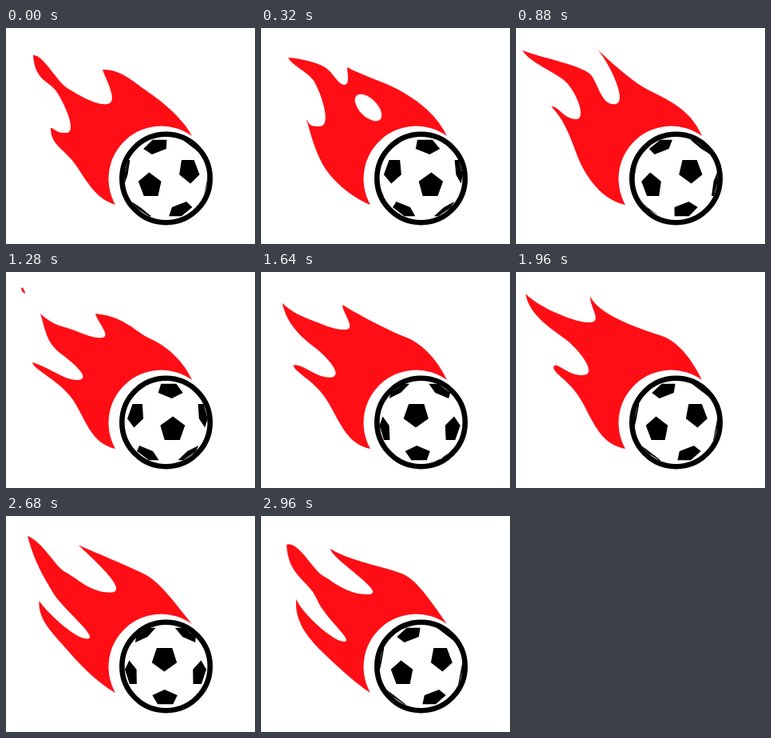
These frames come from a looping animation (312x270 px, 3000 ms). An HTML page:

```html
<!DOCTYPE html>
<html lang="en">
<head>
<meta charset="utf-8">
<title>Flaming football</title>
<style>
html, body { margin: 0; width: 100%; height: 100%; overflow: hidden; background: #fff; }
svg { display: block; width: 312px; height: 270px; }
#flame, #hole, #spark { animation: 3000ms infinite; }
#flame { fill: #ff0e15; animation-name: flicker; }
#hole { fill: #fff; animation-name: gap; animation-timing-function: steps(4); }
#spark { fill: #ff0e15; animation-name: fly; animation-timing-function: steps(4); }

/* Each outline: upper edge, upper tongue, notch, main tongue, notch, lower tongue, arc round the ball */
@keyframes flicker {
  0% {
    animation-timing-function: steps(8);
    d: path("M233 135C220 110 190 88 174 77S144 52 121 52C124 62 142 93 127 95S92 84 78 76S46 32 34 34C36 66 54 66 63 79S90 130 76 131S60 124 56 125C56 148 74 150 90 175S116 214 137 221A66 66 0 0 1 233 135Z");
  }
  10.66% {
    animation-timing-function: steps(7);
    d: path("M233 135C218 104 190 87 172 77S128 60 108 49C108 56 112 72 104 71S90 55 80 49S50 38 34 37C40 48 58 54 66 66S90 122 74 123S60 116 57 115C62 130 66 150 77 170S114 212 137 221A66 66 0 0 1 233 135Z");
  }
  20% {
    animation-timing-function: steps(7);
    d: path("M233 135C218 102 189 88 168 77S120 46 103 34C110 44 128 84 115 84S97 64 87 53S40 30 14 12C28 42 52 53 64 66S90 119 74 118S57 107 50 106C60 121 66 140 76 162S109 213 137 221A66 66 0 0 1 233 135Z");
  }
  29.33% {
    animation-timing-function: steps(10);
    d: path("M233 135C218 100 188 89 165 77S112 36 99 24C112 34 142 92 125 95S104 73 95 60S34 38 8 28C18 44 48 54 62 67S90 116 74 114S54 98 44 98C58 112 66 130 75 155S104 214 137 221A66 66 0 0 1 233 135Z");
  }
  42.66% {
    animation-timing-function: steps(17);
    d: path("M233 135C224 114 204 94 182 84S150 56 112 52C114 62 132 80 121 82S92 75 80 71S58 66 43 52C50 74 50 88 70 103S106 134 90 135S56 120 33 113C34 122 68 136 84 160S106 214 137 221A66 66 0 0 1 233 135Z");
  }
  65.33% {
    animation-timing-function: steps(11);
    d: path("M233 135C222 112 204 87 183 80S106 56 93 31C92 42 108 62 94 63S62 56 50 51S20 36 12 27C16 54 46 72 62 84S104 128 84 129S48 108 47 120C50 130 70 136 86 168S112 216 137 221A66 66 0 0 1 233 135Z");
  }
  80% {
    animation-timing-function: steps(14);
    d: path("M233 135C220 122 188 80 168 72S112 34 95 32C112 38 152 90 130 93S86 73 72 66S46 34 22 14C38 42 36 74 48 88S118 149 100 150S46 114 39 108C38 128 58 140 78 167S116 210 137 221A66 66 0 0 1 233 135Z");
  }
  98.66%, 100% {
    animation-timing-function: steps(1);
    d: path("M233 135C222 120 202 88 184 76S118 60 87 41C88 54 162 98 134 98S90 81 78 75S46 30 32 36C34 76 60 80 70 104S118 157 104 157S52 122 44 104C42 132 58 152 80 173S120 210 137 221A66 66 0 0 1 233 135Z");
  }
}
@keyframes gap {
  0%, 5.33% { transform: translate(134.5px, 99.5px) rotate(45deg) scale(0); }
  10.66% { transform: translate(134.5px, 99.5px) rotate(45deg) scale(1); }
  16%, 100% { transform: translate(124px, 90px) rotate(45deg) scale(0); }
}
@keyframes fly {
  0% { opacity: 0; animation-timing-function: steps(1); }
  37.33% { opacity: 1; transform: translate(6px, 7px); }
  42.66% { opacity: 1; transform: none; animation-timing-function: steps(1); }
  45.33%, 100% { opacity: 0; transform: none; }
}
</style>
</head>
<body>
<svg viewBox="0 0 312 270">
  <path id="flame"/>
  <ellipse id="hole" rx="21" ry="11"/>
  <path id="spark" d="M19 20C21 18 24 24 24 27C21 26 19 23 19 20Z"/>
  <circle cx="200.5" cy="188" r="55" fill="#fff"/>
  <path id="patches"/>
  <circle cx="200.5" cy="188" r="55.2" fill="none" stroke="#000" stroke-width="6.6"/>
</svg>
<script>
const CX = 200.5, CY = 187.5, R = 52.5;
const LOOP = 3000, STEP = 40, START = -24;
const PATCH = 2.25; // larger values give smaller patches
const rad = deg => deg * Math.PI / 180;
const dot = (a, b) => a[0] * b[0] + a[1] * b[1] + a[2] * b[2];
const cross = (a, b) => [
  a[1] * b[2] - a[2] * b[1],
  a[2] * b[0] - a[0] * b[2],
  a[0] * b[1] - a[1] * b[0]
];

// Patch centres: icosahedron corners standing on a face, in four rings of three.
const centres = [];
for (const [y, turn] of [[-0.7947, 0], [-0.1876, 60], [0.1876, 0], [0.7947, 60]]) {
  const r = Math.sqrt(1 - y * y);
  for (let k = 0; k < 3; k++) {
    const a = rad(turn + k * 120);
    centres.push([r * Math.sin(a), y, r * Math.cos(a)]);
  }
}

// Each pentagon corner lies on the way to a neighbouring centre.
const pentagons = centres.map(c => {
  const near = centres.filter(n => dot(c, n) > 0.3 && dot(c, n) < 0.9);
  const u = near[0], v = cross(c, u);
  const angle = n => Math.atan2(dot(n, v), dot(n, u) - dot(n, c) * dot(c, u));
  return near.sort((a, b) => angle(a) - angle(b)).map(n => {
    const p = c.map((x, i) => PATCH * x + n[i]);
    const len = Math.hypot(...p);
    return p.map(x => x / len);
  });
});

function spin([x, y, z], a) {
  return [x * Math.cos(a) + z * Math.sin(a), y, z * Math.cos(a) - x * Math.sin(a)];
}

// Corners behind the ball are pushed to its rim.
function project([x, y, z]) {
  const k = z < 0 ? R / Math.hypot(x, y) : R;
  return (CX + x * k).toFixed(2) + " " + (CY + y * k).toFixed(2);
}

const patches = document.getElementById("patches");
function draw(now) {
  const t = Math.floor((now % LOOP) / STEP) * STEP;
  const a = rad(START + 360 * t / LOOP);
  patches.setAttribute("d", pentagons
    .map(p => p.map(q => spin(q, a)))
    .filter(p => p.some(q => q[2] > 0))
    .map(p => "M" + p.map(project).join("L") + "Z")
    .join(""));
  requestAnimationFrame(draw);
}
draw(performance.now());
</script>
</body>
</html>
```
